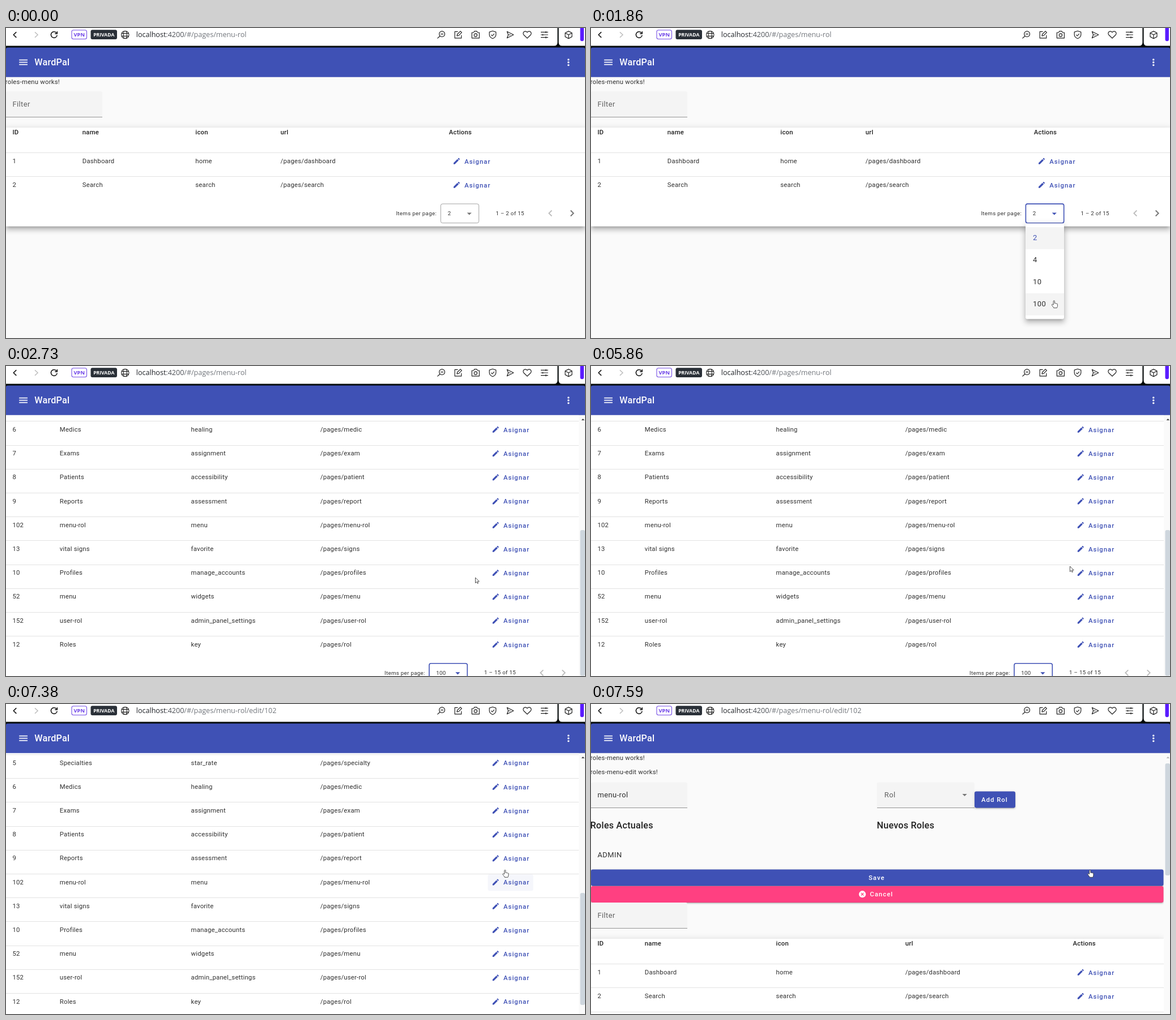
Animation, 1022 px wide and 548 px high, one loop 8 s. Source, as an HTML page:

```html
<!DOCTYPE html>
<html lang="es">
<head>
<meta charset="utf-8">
<title>Menu roles</title>
<style>
  html, body { margin: 0; width: 100%; height: 100%; overflow: hidden; background: #fafafa; }
  svg { display: block; width: 1022px; height: 548px; }
  text { font-family: Roboto, "Liberation Sans", sans-serif; white-space: pre; }
  .url { font-family: "Open Sans", "Noto Sans", sans-serif; }
</style>
</head>
<body>
<svg id="stage" viewBox="0 0 1022 548" xmlns="http://www.w3.org/2000/svg"></svg>
<script>
const LOOP = 8000, STEP = 66.55;
const BLUE = '#3f51b5', HEAD = 'rgba(0,0,0,.87)', INK = 'rgba(0,0,0,.81)';
const SOFT = 'rgba(0,0,0,.6)', FAINT = 'rgba(0,0,0,.26)';
const ROW = 42.2, EDIT_SHIFT = 239, TABLE_END = 333.8, EDIT_END = 572.8;
const stage = document.getElementById('stage');

// ---------- drawing helpers ----------
function el(parent, tag, attrs = {}, content) {
  const node = document.createElementNS('http://www.w3.org/2000/svg', tag);
  for (const key in attrs) node.setAttribute(key, attrs[key]);
  if (content !== undefined) node.textContent = content;
  parent.appendChild(node);
  return node;
}
const group = (parent, attrs) => el(parent, 'g', attrs);
const rect = (parent, x, y, width, height, fill, rx = 0, more = {}) =>
  el(parent, 'rect', { x, y, width, height, fill, rx, ...more });
const rule = (parent, x, y, w, fill) => rect(parent, x, y, w, 1, fill, 0, { 'shape-rendering': 'crispEdges' });
const path = (parent, d, attrs) => el(parent, 'path', { d, ...attrs });
const line = (parent, d, stroke = '#222', width = 1.2, more = {}) =>
  path(parent, d, { fill: 'none', stroke, 'stroke-width': width, 'stroke-linejoin': 'round', ...more });

// Text is placed by the middle of its capitals; the small lift makes baselines round down.
function label(parent, x, midY, str, size = 11.35, fill = INK, weight = 400, spacing = .2, more = {}) {
  return el(parent, 'text', {
    x, y: midY + size * .356 - .48, 'font-size': size, fill,
    'font-weight': weight, 'letter-spacing': spacing, ...more
  }, str);
}
const buttonLabel = (parent, x, y, str, fill) => label(parent, x, y, str, 11.35, fill, 500, 1.01);

function shadow(parent, x, y, w, h, layers) {
  for (const [dy, blur, spread, alpha] of layers)
    rect(parent, x - spread, y + dy - spread, w + 2 * spread, h + 2 * spread, `rgba(0,0,0,${alpha})`, 2,
      { style: `filter:blur(${blur / 2}px)` });
}
const HIGH = [[4, 4, -2.4, .2], [6.5, 8, .8, .14], [2.4, 11, 1.6, .12]];
const LOW = [[2.4, .8, -1.6, .2], [1.6, 1.6, 0, .14], [.8, 4, 0, .12]];

function field(parent, x, y, w, str, fill = SOFT) {
  path(parent, `M${x} ${y + 45}v-42q0-3 3-3h${w - 6}q3 0 3 3v42z`, { fill: '#f4f4f4' });
  rule(parent, x, y + 44.6, w, '#949494');
  return label(parent, x + (x ? 13.3 : 11.4), y + 22.6, str, 13, fill, 400, .4);
}
const triangle = (parent, x, y, fill) => path(parent, `M${x - 4.1} ${y - 2}h8.2l-4.1 4.1z`, { fill });
const show = (node, on) => node.setAttribute('display', on ? 'inline' : 'none');

// ---------- table ----------
const DATA = `1|Dashboard|home|dashboard
2|Search|search|search
3|Consult Autocomplete|insert_drive_file|consult-autocomplete
4|Consult Wizard|view_carousel|consult-wizard
5|Specialties|star_rate|specialty
6|Medics|healing|medic
7|Exams|assignment|exam
8|Patients|accessibility|patient
9|Reports|assessment|report
102|menu-rol|menu|menu-rol
13|vital signs|favorite|signs
10|Profiles|manage_accounts|profiles
52|menu|widgets|menu
152|user-rol|admin_panel_settings|user-rol
12|Roles|key|rol`.split('\n').map(r => r.split('|'));

const PENCIL = 'M3 17.25V21h3.75L17.81 9.94l-3.75-3.75L3 17.25zM20.71 7.04c.39-.39.39-1.02 0-1.41l-2.34-2.34c-.39-.39-1.02-.39-1.41 0l-1.83 1.83 3.75 3.75 1.83-1.83z';

function chevron(parent, x, y, dir, fill) {
  path(parent, 'M8.59 16.59L13.17 12 8.59 7.41 10 6l6 6-6 6-1.41-1.41z',
    { fill, transform: `translate(${x} ${y}) scale(${.945 * dir} .945) translate(-12.3 -12)` });
}

function paginator(parent, y, o) {
  label(parent, o.x - 78.6, y + .4, 'Items per page:', 9.72, INK, 400, .32);
  const box = rect(parent, o.x + .4, y - 16.6, 67.3, 33.8, 'none', 3.2, { stroke: '#999', 'stroke-width': .9 });
  label(parent, o.x + 12.7, y + .8, o.size, 9.72, INK, 400, .32);
  const arrow = triangle(parent, o.x + 50.8, y + 1, '#757575');
  label(parent, o.x + 97.4, y + .1, o.range, 9.72, INK, 400, .32);
  chevron(parent, o.prev, y, -1, FAINT);
  chevron(parent, o.prev + 39, y, 1, o.next);
  return (color, width) => {
    box.setAttribute('stroke', color);
    box.setAttribute('stroke-width', width);
    arrow.setAttribute('fill', color === BLUE ? BLUE : '#757575');
  };
}

function table(parent, count, width, cols, pager) {
  const g = group(parent), height = 45 + ROW * count + 45.3, hovers = [];
  shadow(g, 0, 176, width, height, HIGH);
  rect(g, 0, 176, width, height, '#fff');
  ['ID', 'name', 'icon', 'url', 'Actions'].forEach((s, i) => label(g, cols[i], 184.5, s, 11.35, HEAD, 500));
  DATA.slice(0, count).forEach(([id, name, icon, url], i) => {
    const y = 235.2 + i * ROW, ax = cols[4];
    rule(g, 0, y - 15.1, width, '#e2e2e2');
    [id, name, icon, '/pages/' + url].forEach((s, c) => label(g, cols[c], y, s));
    hovers.push(rect(g, ax, y - 13.8, 80, 29, BLUE, 3.2, { opacity: 0 }));
    path(g, PENCIL, { fill: BLUE, transform: `translate(${ax + 6.4} ${y - 7.3}) scale(.6075)` });
    buttonLabel(g, ax + 27.4, y + .9, 'Asignar', BLUE);
  });
  const focus = paginator(g, 176 + height - 23.2, pager);
  return { g, hovers, focus };
}

// ---------- page content ----------
rect(stage, 0, 0, 1022, 548, '#fafafa');
const page = group(stage);
label(page, -1.2, 95.2, 'roles-menu works!');

const edit = group(page);
label(edit, -1.2, 120.7, 'roles-menu-edit works!');
field(edit, 0, 138.5, 170, 'menu-rol', INK);
field(edit, 504.5, 138.5, 172.3, 'Rol');
triangle(edit, 659.5, 161, '#757575');
shadow(edit, 677, 154.5, 72, 29, LOW);
rect(edit, 677, 154.5, 72, 29, BLUE, 3.2);
buttonLabel(edit, 689, 169.2, 'Add Rol', '#fff');
label(edit, -1.2, 214.6, 'Roles Actuales', 16.2, HEAD, 500, .2);
label(edit, 504.5, 214.6, 'Nuevos Roles', 16.2, HEAD, 500, .2);
label(edit, 11.4, 266.8, 'ADMIN', 13, INK, 400, .4);
for (const [y, fill] of [[292.5, BLUE], [321.9, '#ff4081']]) {
  shadow(edit, 0, y, 1010.5, 29, LOW);
  rect(edit, 0, y, 1010.5, 29, fill, 3.2);
}
buttonLabel(edit, 490, 307.2, 'Save', '#fff');
el(edit, 'circle', { cx: 479, cy: 336.2, r: 6.1, fill: '#fff' });
line(edit, 'M476.7 333.9l4.6 4.6m0-4.6l-4.6 4.6', '#ff4081', 1.2);
buttonLabel(edit, 492.3, 336.5, 'Cancel', '#fff');

const lower = group(page);
const small = table(lower, 2, 1022, [11.4, 134.8, 334.3, 484.6, 781.8],
  { x: 767, size: '2', range: '1 – 2 of 15', prev: 960.5, next: '#757575' });
const full = table(lower, 15, 1011, [11.4, 94.8, 326.6, 554.8, 850.6],
  { x: 746.6, size: '100', range: '1 – 15 of 15', prev: 945.5, next: FAINT });
full.focus(BLUE, 1.6);
field(lower, 0, 112, 170, 'Filter');

// ---------- dropdown ----------
const menu = group(stage);
shadow(menu, 767, 0, 68, 169, HIGH);
rect(menu, 767, 0, 68, 169, '#fff', 3.2);
const options = ['2', '4', '10', '100'].map((s, i) => {
  const back = rect(menu, 767, 6.5 + i * 39, 68, 39, '#000', 0, { opacity: 0 });
  label(menu, 780, 25.6 + i * 39, s, 13, i ? INK : BLUE, 400, .4);
  return back;
});

// ---------- scrollbar ----------
const bar = group(stage);
rect(bar, 1011, 87, 11, 461, '#fafafa');
const thumb = rect(bar, 1013.5, 105, 8.5, 200, '#ced6dd', 3);
const barArrow = path(bar, 'M1015.6 96l2.8-3 2.8 3z', {});

// ---------- app bar and browser ----------
rect(stage, 0, 0, 1022, 42, '#050a0a');
path(stage, 'M0 86.8V37.5q0-3 3-3H1019q3 0 3 3V86.8z', { fill: BLUE });
for (let i = 0; i < 3; i++) {
  rect(stage, 23.2, 55.7 + i * 4.05, 14.8, 1.65, '#fff');
  el(stage, 'circle', { cx: 992.8, cy: 55.9 + i * 4.86, r: 1.7, fill: '#fff' });
}
label(stage, 50.3, 60.4, 'WardPal', 16.2, '#fff', 500, .2);

path(stage, 'M0 0H973.4V25.5q0 6-6 6H0z', { fill: '#fff' });
path(stage, 'M975.6 0H1022V31.5H981.6q-6 0-6-6z', { fill: '#fff' });
path(stage, 'M1013.5 0h6.5V20q0 3.3-3.2 3.3t-3.3-3.3z', { fill: '#5a1cff' });
line(stage, 'M18.3 7.2L13.2 12l5.1 4.8', '#111', 1.6);
line(stage, 'M51 7.2l5.1 4.8-5.1 4.8', '#bbb', 1.5);
line(stage, 'M89.2 8.7A5.4 5.4 0 1 0 90.2 12.6M90.4 6v4h-4.2', '#111', 1.5);
rect(stage, 116, 3.7, 26.5, 15.8, '#fff', 3, { stroke: '#7650e6', 'stroke-width': 1.1 });
label(stage, 129.3, 12.2, 'VPN', 9.3, '#6a3de8', 700, 0, { class: 'url', 'text-anchor': 'middle' });
rect(stage, 149.5, 3.3, 46.5, 16.6, '#2a3038', 3);
label(stage, 172.8, 12.2, 'PRIVADA', 8.6, '#fff', 700, 0, { class: 'url', 'text-anchor': 'middle' });
line(stage, 'M203.6 12a6.7 6.7 0 1 0 13.4 0a6.7 6.7 0 1 0-13.4 0M207.2 12a3.1 6.7 0 1 0 6.2 0a3.1 6.7 0 1 0-6.2 0M204.4 9.6h11.8M204.4 14.4h11.8', '#222', 1.1);
const url = label(stage, 229.8, 12.2, '', 12.54, '#72767c', 400, 0, { class: 'url' });
el(url, 'tspan', { fill: '#1f2227' }, 'localhost');
el(url, 'tspan', { fill: '#4b4f55' }, ':4200');
const route = el(url, 'tspan');

[
  'M774.5 10.6a4.9 4.9 0 1 0-9.8 0a4.9 4.9 0 1 0 9.8 0M766 14.2l-4.6 4.2M767.2 10.6h4.8',
  'M797.5 6.3h-5.3v11.6h11.6v-5.2M796 14l.7-3 5.4-5.4 2.3 2.3-5.4 5.4z',
  'M822.4 8h3l1.5-2.3h4l1.5 2.3h3v9.8h-13zM826.2 12.6a2.7 2.7 0 1 0 5.4 0a2.7 2.7 0 1 0-5.4 0',
  'M859 5.3l5.8 1.8v4.6q0 4.6-5.8 7q-5.8-2.4-5.8-7V7.1zM856.3 11.8l2 2 3.6-3.6',
  'M884.4 6.3l11.4 5.7-11.4 5.7 2.2-5.7zM886.6 12h4',
  'M920 18l-6-5.8c-3.4-3.8 2-9.2 6-4.6c4-4.6 9.4.8 6 4.6z',
  'M944 7.4h12.8M944 12h12.8M944 16.6h12.8M953 5.8v3.2M947.5 10.4v3.2M953 15v3.2',
  'M993 5.6l6 3.2v6.6l-6 3.3-6-3.3V8.8zM987 8.8l6 3.2 6-3.2M993 12v6.7'
].forEach(d => line(stage, d));

// ---------- pointer ----------
const pointer = group(stage);
const ARROW = 'M0 0V9.6L2.2 7.5 3.7 10.6 5.1 9.9 3.7 6.9H6.8z';
const HAND = 'M-2.2 1V-5.2a1.1 1.1 0 0 1 2.2 0V-1.4a1 1 0 0 1 1.8 .3a1 1 0 0 1 1.7 .4a.9 .9 0 0 1 1.5 .9V3.2c0 1.6-.9 2.1-1.1 3.3H-1.7C-2 4.8-4.6 2.8-5 1.3c-.3-1.1 .9-1.7 1.6-1z';
const shape = path(pointer, '', { fill: '#fff', stroke: '#3a3a3a', 'stroke-width': .9, 'stroke-linejoin': 'round' });

// ---------- motion ----------
const clamp = v => Math.max(0, Math.min(1, v));
const smooth = v => { v = clamp(v); return v * v * (3 - 2 * v); };
const between = (k, from, to) => smooth((k - from) / (to - from));

// step, x, y of the pointer tip
const TRAIL = [
  [3, 974, 540], [10, 822, 327], [18, 822, 327], [27, 817, 482], [32, 817, 482],
  [37, 828.5, 374], [87, 828.5, 374], [88, 845.4, 354], [93, 887, 287.5],
  [105, 887, 287.5], [107, 880.5, 293.5], [120, 880.5, 293.5]
];
function tipAt(k) {
  const i = Math.max(1, TRAIL.findIndex(p => p[0] >= k));
  const [a, x0, y0] = TRAIL[i - 1], [b, x1, y1] = TRAIL[i];
  const p = between(k, a, b);
  return [x0 + (x1 - x0) * p, y0 + (y1 - y0) * p];
}

function render(t) {
  const k = Math.floor((t + 10) / STEP);
  const isFull = k >= 32, isEdit = k >= 99;
  const scroll = isEdit ? EDIT_END * (1 - between(k, 110.48, 114))
                        : TABLE_END * between(k, 37.72, 41);

  page.setAttribute('transform', `translate(0 ${-scroll})`);
  lower.setAttribute('transform', `translate(0 ${isEdit ? EDIT_SHIFT : 0})`);
  show(edit, isEdit);
  show(small.g, !isFull);
  show(full.g, isFull);
  show(bar, isFull);
  thumb.setAttribute('y', 105 + scroll * (isEdit ? .425 : .554));
  thumb.setAttribute('height', isEdit ? 198 : 257.5);
  barArrow.setAttribute('fill', scroll < 1 ? '#b5b5b5' : '#444');
  route.textContent = '/#/pages/menu-rol' + (isEdit ? '/edit/102' : '');

  // pointer
  const [x, y] = tipAt(k);
  const overSelect = k < 19 && x < 835 && y < 345;
  const overMenu = k >= 19 && k < 33 && y > 352;
  const overButton = k >= 91;
  const hand = overSelect || overMenu || overButton;
  show(pointer, k >= 3);
  shape.setAttribute('d', hand ? HAND : ARROW);
  pointer.setAttribute('transform', `translate(${x + (hand ? 1.4 : 0)} ${y + (hand ? 6.3 : 0)})`);

  // select and its menu
  if (k >= 16) small.focus(BLUE, 1.6);
  else small.focus(overSelect ? '#212121' : '#999', .9);
  const opened = clamp((k - 15) / 3), fade = clamp((34 - k) / 3);
  show(menu, k >= 16 && k < 34);
  menu.setAttribute('transform', `translate(0 345.5) scale(1 ${.8 + .2 * opened})`);
  menu.setAttribute('opacity', k < 31 ? opened : fade);
  const over = overMenu ? Math.floor((y - 352) / 39) : -1;
  options.forEach((o, i) => o.setAttribute('opacity', i === over ? (k >= 31 ? .1 : .045) : i ? 0 : .045));

  // row button
  const pressed = k >= 97 && k < 100;
  full.hovers[9].setAttribute('opacity', k >= 91 && k < 114 ? (pressed ? .12 : .05) : 0);
}

const start = performance.now();
function tick() {
  render((performance.now() - start) % LOOP);
  requestAnimationFrame(tick);
}
tick();
</script>
</body>
</html>
```
